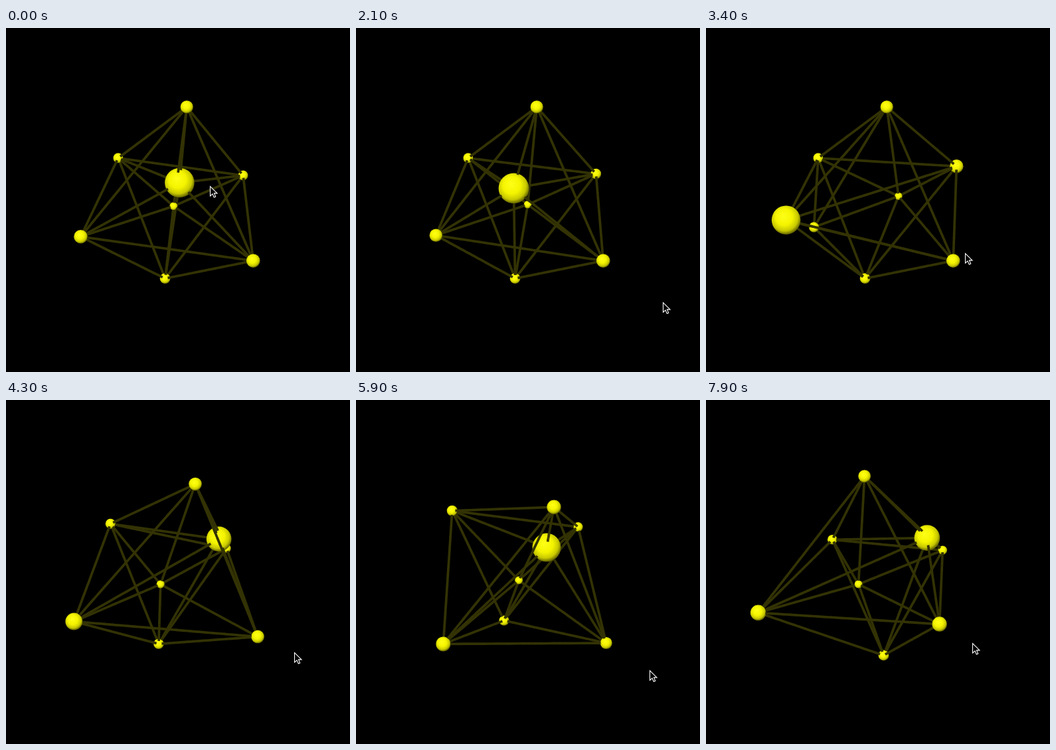
Write an HTML page with a canvas that moves like this. It is 518 by 518 pixels and loops after 8000 ms.

```html
<!DOCTYPE html>
<html>
<head>
<meta charset="utf-8">
<style>
html, body { margin: 0; width: 100%; height: 100%; overflow: hidden; background: #000; }
canvas { display: block; }
</style>
</head>
<body>
<canvas id="stage" width="518" height="518"></canvas>
<script>
const ctx = document.getElementById('stage').getContext('2d');
const LOOP = 8000, STEP = 100;
const CX = 254.3, CY = 260.8, SCALE = 156;
const NEAR4 = 0.567, NEAR3 = 0.266;   // strength of the 4D and 3D perspective
const TILT = 5 * Math.PI / 180;
const DRAG = 0.0117;                  // radians per dragged pixel

// Three axes of the solid in the starting view: x right, y down, z to the viewer
const AXES = [[0.104, -0.823, 0.559], [0.635, 0.483, 0.602], [-0.764, 0.289, 0.571]];

// Pointer path: seconds, x, y
const PATH = [
  [0, 307, 238], [0.9, 444, 375], [1.3, 451, 390], [1.7, 462, 413], [2.7, 462, 413],
  [3.3, 390, 339], [3.8, 390, 339], [4.1, 423.5, 371], [4.5, 444, 388], [5, 442, 407],
  [6.7, 442, 407], [7.2, 401, 366], [8, 401, 366]
];
// Straight legs of the path on which the solid is dragged: start, end
const DRAGS = [[4.1, 4.5], [4.5, 5], [6.7, 7.2]];

const mix = (a, b, f) => a.map((v, i) => v + (b[i] - v) * f);
const distance = (a, b) => Math.hypot(...a.map((v, i) => v - b[i]));

function pointer(t) {
  const i = Math.max(1, PATH.findIndex(k => k[0] >= t));
  const [a, b] = [PATH[i - 1], PATH[i]];
  return mix(a, b, (t - a[0]) / (b[0] - a[0])).slice(1);
}

// Roll the vector in the direction of a drag by (dx, dy)
function roll([x, y, z], dx, dy) {
  const len = Math.hypot(dx, dy);
  if (!len) return [x, y, z];
  const a = -dy / len, b = dx / len, c = Math.cos(len * DRAG), s = Math.sin(len * DRAG);
  const d = (a * x + b * y) * (1 - c);
  return [x * c + b * z * s + a * d, y * c - a * z * s + b * d, z * c + (a * y - b * x) * s];
}

function view(t) {
  return AXES.map(v => DRAGS.reduce((p, [start, end]) => {
    if (t <= start) return p;
    const from = pointer(start), to = pointer(Math.min(t, end));
    return roll(p, to[0] - from[0], to[1] - from[1]);
  }, v));
}

function project([x, y, z]) {
  const k = 1 / (1 - NEAR3 * z);
  return { x: CX + SCALE * x * k, y: CY + SCALE * y * k, k };
}

// Eight corners of the 16-cell, opposite corners next to each other
function corners(t) {
  const [top, right, spin] = view(t);
  const angle = 0.77 - 0.875 * (Math.max(t, 0.4) - 1.3);
  const cs = Math.cos(angle), sn = Math.sin(angle), ct = Math.cos(TILT), st = Math.sin(TILT);
  const ring = (c, s) => [...top.map((v, i) => v * st * c + spin[i] * s), ct * c];
  const half = [[...top.map(v => v * ct), -st], [...right, 0], ring(cs, sn), ring(-sn, cs)];
  return half.flatMap(v => [v, v.map(n => -n)]).map(([x, y, z, w]) => {
    const k = 1 / (1 - NEAR4 * w);
    const radius = (0.061 - 0.0065 * Math.hypot(x, y)) * k;
    return { pos: [x * k, y * k, z * k], radius };
  });
}

function drawBall({ pos, radius }) {
  const p = project(pos), r = radius * SCALE * p.k;
  const g = ctx.createRadialGradient(p.x - r * 0.2, p.y - r * 0.3, 0, p.x - r * 0.08, p.y - r * 0.15, r * 1.16);
  g.addColorStop(0, '#ffff18');
  g.addColorStop(0.5, '#f4f400');
  g.addColorStop(0.8, '#c8c800');
  g.addColorStop(1, '#5c5c00');
  ctx.fillStyle = g;
  ctx.beginPath();
  ctx.arc(p.x, p.y, r, 0, 7);
  ctx.fill();
}

function drawRod(a, b) {
  const p = project(a), q = project(b);
  ctx.strokeStyle = '#333305';
  ctx.lineWidth = 3.7;
  ctx.beginPath();
  ctx.moveTo(p.x, p.y);
  ctx.lineTo(q.x, q.y);
  ctx.stroke();
}

// Short pieces from surface to surface, so that rods and balls can be sorted by depth
function addRod(items, balls, a, b) {
  const len = distance(a.pos, b.pos), n = 24;
  const from = a.radius / len, span = 1 - from - b.radius / len;
  const others = balls.filter(o => o !== a && o !== b);
  for (let i = 0; i < n; i++) {
    const p = mix(a.pos, b.pos, from + span * i / n);
    const q = mix(a.pos, b.pos, from + span * Math.min(n, i + 1.1) / n);
    const mid = mix(p, q, 0.5);
    if (others.some(o => distance(mid, o.pos) < o.radius)) continue;
    items.push({ z: mid[2], draw: () => drawRod(p, q) });
  }
}

const arrow = new Path2D('M.5 .5V15L4 11.8L6.3 17L8.7 16L6.5 10.9H11Z');

function drawPointer(t) {
  const [x, y] = pointer(t);
  ctx.save();
  ctx.translate(Math.round(x), Math.round(y));
  ctx.fillStyle = '#000';
  ctx.strokeStyle = '#fff';
  ctx.lineWidth = 1.1;
  ctx.fill(arrow);
  ctx.stroke(arrow);
  ctx.restore();
}

function frame(now) {
  const t = Math.floor(now % LOOP / STEP) * STEP / 1000;
  ctx.fillStyle = '#000';
  ctx.fillRect(0, 0, 518, 518);
  const balls = corners(t);
  const items = balls.map(b => ({ z: b.pos[2], draw: () => drawBall(b) }));
  balls.forEach((a, i) => balls.forEach((b, j) => {
    if (i < j && i >> 1 !== j >> 1) addRod(items, balls, a, b);
  }));
  items.sort((a, b) => a.z - b.z).forEach(item => item.draw());
  drawPointer(t);
  requestAnimationFrame(() => frame(performance.now()));
}
frame(performance.now());
</script>
</body>
</html>
```
